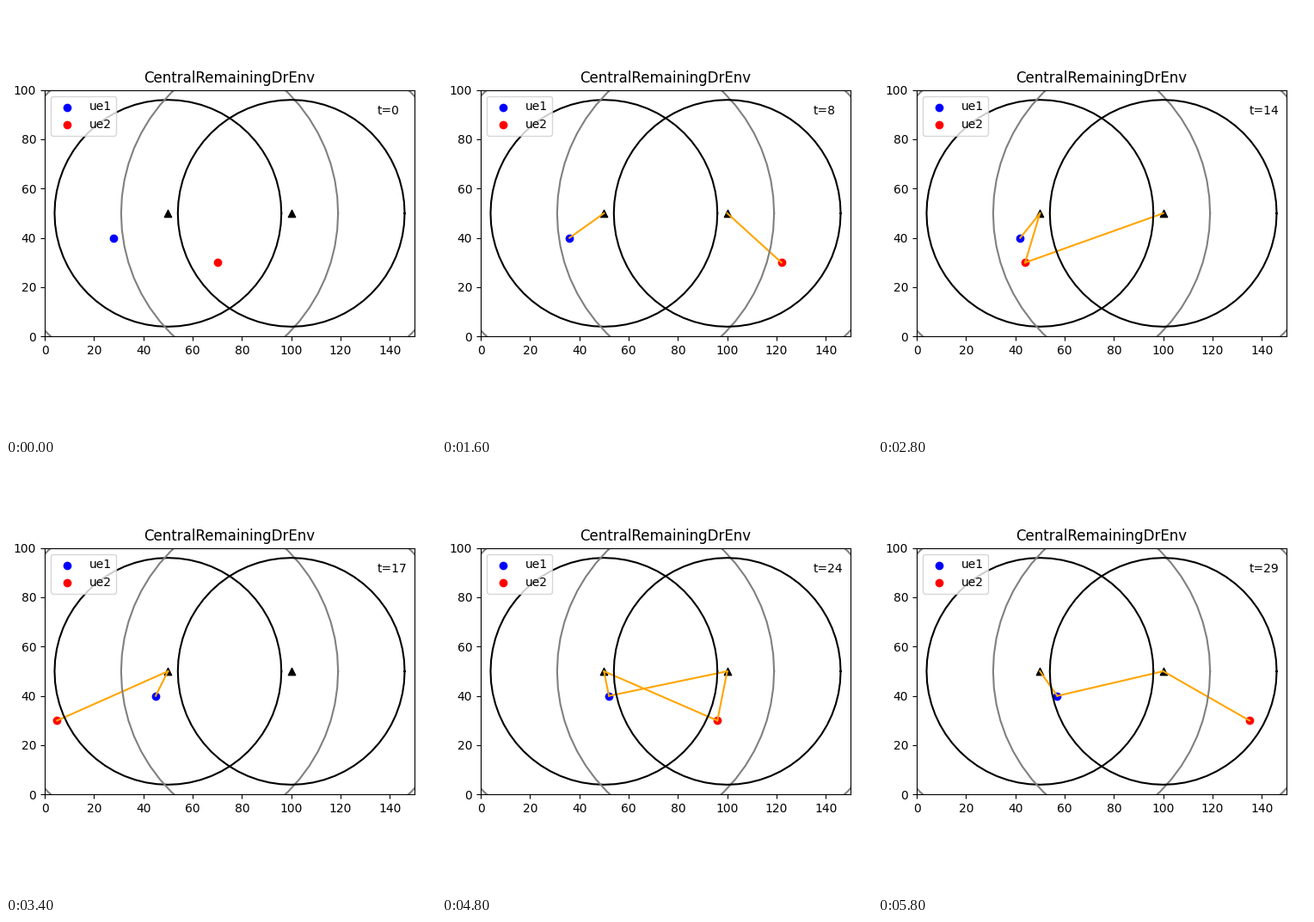
Recreate the animation shown at these times as a matplotlib script. Size 500 by 500 pixels, loop 6000 ms.

```python
import numpy as np
import matplotlib.pyplot as plt
from matplotlib.animation import FuncAnimation

STEPS, INTERVAL = 30, 200
WIDTH, HEIGHT = 150, 100
STATIONS = [(50, 50), (100, 50)]
RANGES = [(46, "black"), (69, "gray")]

# (user, station): first and last step of each connected period
LINKS = {
    (0, 0): [(1, 29)],
    (0, 1): [(21, 29)],
    (1, 0): [(14, 25)],
    (1, 1): [(1, 14), (21, 29)],
}


def bounce(start, step, t, low, high):
    """Move at constant speed, turning round at both limits."""
    span = high - low
    d = (start - low + step * t) % (2 * span)
    return low + min(d, 2 * span - d)


def positions(t):
    return [(28 + t, 40), (bounce(70, 13, t, 5, 148), 30)]


def connected(pair, t):
    return any(a <= t <= b for a, b in LINKS[pair])


plt.rcParams["font.family"] = "DejaVu Sans"
fig = plt.figure(figsize=(5, 5), dpi=100)
plot_h = 0.86 * HEIGHT / WIDTH
ax = fig.add_axes([0.09, 0.518 - plot_h / 2, 0.86, plot_h])
ax.set_xlim(0, WIDTH)
ax.set_ylim(0, HEIGHT)
ax.set_title("CentralRemainingDrEnv")

users = [ax.scatter(*pos, color=color, label=name)
         for pos, color, name in zip(positions(0), ("blue", "red"), ("ue1", "ue2"))]
lines = {pair: ax.plot([], [], color="orange")[0] for pair in LINKS}

angle = np.linspace(0, -2 * np.pi, 65)
for x, y in STATIONS:
    ax.scatter(x, y, marker="^", color="black")
    for r, color in RANGES:
        ax.plot(x + r * np.cos(angle), y + r * np.sin(angle), color=color)

clock = ax.text(0.9 * WIDTH, 0.9 * HEIGHT, "t=0")
ax.legend(loc="upper left")


def update(t):
    pos = positions(t)
    for user, p in zip(users, pos):
        user.set_offsets([p])
    for pair, line in lines.items():
        (x0, y0), (x1, y1) = pos[pair[0]], STATIONS[pair[1]]
        line.set_data([x0, x1], [y0, y1])
        line.set_visible(connected(pair, t))
    clock.set_text(f"t={t}")
    return [*users, *lines.values(), clock]


anim = FuncAnimation(fig, update, frames=STEPS, interval=INTERVAL,
                     repeat=True, repeat_delay=0, blit=False)
plt.show()
```
